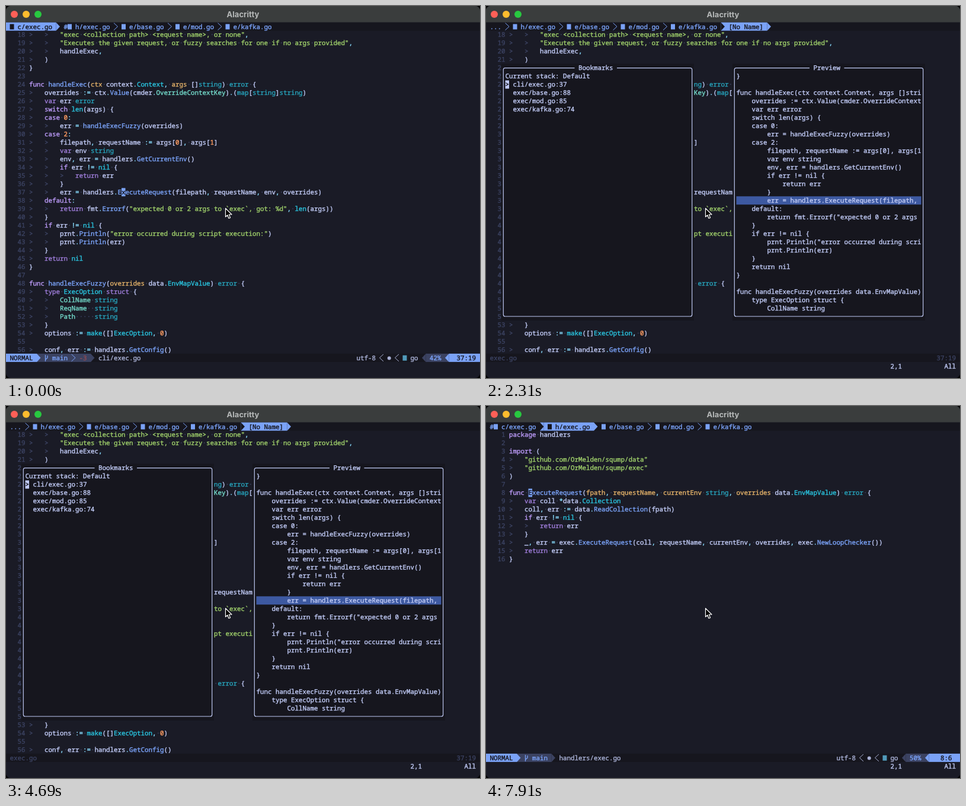
An HTML page with a canvas that plays this animation: 800x628 px, repeating every 8 s.

```html
<!DOCTYPE html>
<html lang="en">
<head>
<meta charset="utf-8">
<title>Terminal</title>
<style>
html, body { margin: 0; width: 800px; height: 628px; overflow: hidden; background: #000; }
canvas { display: block; }
</style>
</head>
<body>
<canvas id="stage" width="800" height="628"></canvas>
<script>
const ctx = document.getElementById('stage').getContext('2d');
const CW = 6.5, CH = 13.98, TOP = 27.7, LOOP = 8000;
const MONO = '10.833px "Noto Sans Mono", "DejaVu Sans Mono", monospace';
const C = {
  bg: '#1a1b26', dark: '#16161e', fg: '#c0caf5', dim: '#3b4261', blue: '#7aa2f7',
  green: '#9ece6a', magenta: '#bb9af7', purple: '#9d7cd8', orange: '#ff9e64',
  cyan: '#2ac3de', builtin: '#27a1b9', yellow: '#e0af68', field: '#73daca',
  op: '#89ddff', soft: '#a9b1d6', select: '#3d59a1', removed: '#914c54', go: '#519aba'
};

const caller = `        "exec <collection path> <request name>, or none",
        "Executes the given request, or fuzzy searches for one if no args provided",
        handleExec,
    )
}

func handleExec(ctx context.Context, args []string) error {
    overrides := ctx.Value(cmder.OverrideContextKey).(map[string]string)
    var err error
    switch len(args) {
    case 0:
        err = handleExecFuzzy(overrides)
    case 2:
        filepath, requestName := args[0], args[1]
        var env string
        env, err = handlers.GetCurrentEnv()
        if err != nil {
            return err
        }
        err = handlers.ExecuteRequest(filepath, requestName, env, overrides)
    default:
        return fmt.Errorf("expected 0 or 2 args to \`exec\`, got: %d", len(args))
    }
    if err != nil {
        prnt.Println("error occurred during script execution:")
        prnt.Println(err)
    }
    return nil
}

func handleExecFuzzy(overrides data.EnvMapValue) error {
    type ExecOption struct {
        CollName string
        ReqName  string
        Path     string
    }
    options := make([]ExecOption, 0)

    conf, err := handlers.GetConfig()`.split('\n');

const callee = `package handlers

import (
    "github.com/OrMelden/sqump/data"
    "github.com/OrMelden/sqump/exec"
)

func ExecuteRequest(fpath, requestName, currentEnv string, overrides data.EnvMapValue) error {
    var coll *data.Collection
    coll, err := data.ReadCollection(fpath)
    if err != nil {
        return err
    }
    _, err = exec.ExecuteRequest(coll, requestName, currentEnv, overrides, exec.NewLoopChecker())
    return err
}`.split('\n');

const words = {
  magenta: 'func package import switch case default if',
  purple: 'var return type struct',
  builtin: 'string error map',
  cyan: 'nil len make Context EnvMapValue ExecOption Collection',
  field: 'OverrideContextKey CollName ReqName Path'
};
const wordColor = new Map();
for (const name in words) for (const w of words[name].split(' ')) wordColor.set(w, C[name]);
const params = /^(ctx|args|overrides|fpath|requestName|currentEnv)$/;

const rowY = row => TOP + row * CH;

function cells(col, row, n, color, rows = 1) {
  ctx.fillStyle = color;
  ctx.fillRect(col * CW, rowY(row), n * CW, rows * CH);
}

// A hairline stroke gives the glyphs a medium weight.
function text(col, row, str, color) {
  ctx.lineWidth = 0.4;
  [...str].forEach((ch, i) => {
    if (ch === ' ') return;
    const x = (col + i) * CW, y = rowY(row) + 10.8;
    ctx.fillStyle = ctx.strokeStyle = ch === '·' ? C.dim : color;
    ctx.fillText(ch, x, y);
    ctx.strokeText(ch, x, y);
  });
}

// Powerline separators: dir 1 points right, -1 points left.
function wedge(col, row, color, dir = 1, solid = true) {
  const x = (col + (dir < 0 ? 1 : 0)) * CW, y = rowY(row);
  ctx.beginPath();
  ctx.moveTo(x, solid ? y : y + 1);
  ctx.lineTo(x + dir * CW, y + CH / 2);
  ctx.lineTo(x, solid ? y + CH : y + CH - 1);
  ctx.fillStyle = ctx.strokeStyle = color;
  ctx.lineWidth = 1;
  if (solid) ctx.fill(); else ctx.stroke();
}

function icon(col, row, color) {
  ctx.fillStyle = color;
  ctx.fillRect(col * CW, rowY(row) + 2.8, 7, 9);
}

function tokenColor(token, line, end) {
  if (token[0] === '"') return C.green;
  if (/^\d+$/.test(token)) return C.orange;
  if (wordColor.has(token)) return wordColor.get(token);
  if (/^\w/.test(token)) {
    if (line[end] === '(') return C.blue;
    return line.startsWith('func') && params.test(token) ? C.yellow : C.fg;
  }
  return /[()[\]{}]/.test(token) ? C.fg : C.op;
}

function code(lines, first) {
  lines.forEach((line, i) => {
    const row = i + 1, indent = line.search(/\S|$/);
    text(0, row, String(first + i).padStart(5), C.dim);
    for (let c = 0; c < indent; c += 4) text(6 + c, row, '>', C.dim);
    for (const m of line.matchAll(/"[^"]*"|\w+|[:!]?=|\S| /g)) {
      if (m.index < indent) continue;
      const end = m.index + m[0].length;
      text(6 + m.index, row, m[0].replace(/ /g, '·'), tokenColor(m[0], line, end));
    }
  });
}

function cursor(col, row, ch, color) {
  cells(col, row, 1, color);
  text(col, row, ch, C.dark);
}

// "■" in a label stands for the file icon.
function tabs(labels, active) {
  cells(0, 0, 124, C.dark);
  let col = 0;
  labels.forEach((label, i) => {
    const on = i === active, end = col + label.length + 2, color = on ? C.dark : C.blue;
    if (on) {
      if (i) {
        cells(col - 1, 0, 1, C.blue);
        wedge(col - 1, 0, C.dark);
      }
      cells(col, 0, end - col, C.blue);
    }
    text(col + 1, 0, label.replace('■', ' '), color);
    const at = label.indexOf('■');
    if (at >= 0) icon(col + 1 + at, 0, color);
    if (on) wedge(end, 0, C.blue);
    else if (i < labels.length - 1 && i + 1 !== active) wedge(end, 0, C.blue, 1, false);
    col = end + 1;
  });
}

function branch(col, row) {
  const x = col * CW + 1.5, y = rowY(row);
  ctx.strokeStyle = C.blue;
  ctx.lineWidth = 1.3;
  ctx.beginPath();
  ctx.moveTo(x, y + 2);
  ctx.lineTo(x, y + 13);
  ctx.moveTo(x, y + 10);
  ctx.lineTo(x + 3.5, y + 7);
  ctx.lineTo(x + 3.5, y + 3);
  ctx.stroke();
}

function status(path, percent, pos, removed) {
  const row = 40, end = removed ? 22 : 17;
  cells(0, row, 124, C.dark);
  cells(8, row, end - 8, C.dim);
  cells(0, row, 8, C.blue);
  wedge(8, row, C.blue);
  wedge(end, row, C.dim);
  text(1, row, 'NORMAL', C.dark);
  branch(10, row);
  text(12, row, 'main', C.blue);
  if (removed) {
    wedge(17, row, C.blue, 1, false);
    text(19, row, removed, C.removed);
  }
  text(end + 2, row, path, C.soft);

  text(91, row, 'utf-8', C.soft);
  wedge(97, row, C.soft, -1, false);
  ctx.fillStyle = C.soft;
  ctx.beginPath();
  ctx.arc(99.5 * CW, rowY(row) + 7.5, 3, 0, 7);
  ctx.fill();
  wedge(101, row, C.soft, -1, false);
  icon(103, row, C.go);
  text(105, row, 'go', C.soft);
  wedge(108, row, C.dim, -1);
  cells(109, row, 6, C.dim);
  text(110, row, percent, C.blue);
  wedge(114, row, C.blue, -1);
  cells(115, row, 9, C.blue);
  text(122 - pos.length, row, pos, C.dark);
}

function idleStatus() {
  cells(0, 40, 124, C.dark);
  text(1, 40, 'exec.go', C.dim);
  text(117, 40, '37:19', C.dim);
}

function panel(col, title) {
  cells(col, 5, 50, C.dark, 31);
  ctx.strokeStyle = C.fg;
  ctx.lineWidth = 1.2;
  ctx.beginPath();
  ctx.roundRect((col + 0.5) * CW, rowY(5.5), 49 * CW, 30 * CH, 3);
  ctx.stroke();
  const start = col + Math.floor((50 - title.length) / 2);
  cells(start - 1, 5, title.length + 2, C.dark);
  text(start, 5, title, C.fg);
}

function popups() {
  panel(4, 'Bookmarks');
  text(5, 6, 'Current stack: Default', C.fg);
  ['cli/exec.go:37', 'exec/base.go:88', 'exec/mod.go:85', 'exec/kafka.go:74']
    .forEach((mark, i) => text(7, 7 + i, mark, C.fg));
  cursor(5, 7, '>', C.fg);

  panel(64, 'Preview');
  cells(65, 21, 48, C.select);
  caller.slice(4, 33).forEach((line, i) => text(65, 6 + i, line.slice(0, 48), C.fg));
}

function titleBar() {
  ctx.fillStyle = '#3a3d3d';
  ctx.fillRect(0, 0, 800, TOP);
  ['#ff5f57', '#febc2e', '#28c840'].forEach((color, i) => {
    ctx.fillStyle = color;
    ctx.beginPath();
    ctx.arc(14 + i * 20, 14, 6, 0, 7);
    ctx.fill();
  });
  ctx.font = 'bold 13px Inter, "Open Sans", sans-serif';
  ctx.textAlign = 'center';
  ctx.fillStyle = '#b6b9b9';
  ctx.fillText('Alacritty', 400, 18.5);
  ctx.textAlign = 'left';
}

function pointer() {
  ctx.beginPath();
  [[370.5, 341.5], [370.5, 356], [373.8, 353], [376, 358.5], [378.6, 357.4], [376.3, 352], [381, 352]]
    .forEach(([x, y]) => ctx.lineTo(x, y));
  ctx.closePath();
  ctx.fillStyle = '#000';
  ctx.strokeStyle = '#fff';
  ctx.lineWidth = 1.2;
  ctx.fill();
  ctx.stroke();
}

const files = ['■ e/base.go', '■ e/mod.go', '■ e/kafka.go'];
const starts = [0, 2100, 5810, 5880, 7420];
const [START, MENU, CLOSING, BACK, JUMPED] = starts.keys();

function draw(state) {
  ctx.fillStyle = C.bg;
  ctx.fillRect(0, 0, 800, 628);
  titleBar();
  ctx.font = MONO;
  ctx.textRendering = 'geometricPrecision';
  ctx.lineJoin = 'round';

  if (state === JUMPED) {
    tabs(['#■ c/exec.go', '■ h/exec.go', ...files], 1);
    code(callee, 1);
    cursor(11, 8, 'E', C.blue);
    status('handlers/exec.go', '50%', '8:6 ');
  } else {
    code(caller, 18);
    cursor(30, 20, 'x', C.blue);
    if (state === MENU || state === CLOSING) {
      tabs(['...', '■ h/exec.go', ...files, '[No Name]'], 5);
      idleStatus();
    } else {
      tabs(['■ c/exec.go', '#■ h/exec.go', ...files], 0);
      status('cli/exec.go', '42%', '37:19', '-3');
    }
    if (state === MENU) popups();
  }
  if (state !== START) {
    text(105, 41, '2,1', C.fg);
    text(119, 41, 'All', C.fg);
  }
  pointer();
}

// Rounded window corners.
ctx.beginPath();
ctx.roundRect(0, 0, 800, 628, 8);
ctx.clip();

let shown = -1;
function tick() {
  const t = performance.now() % LOOP;
  const state = starts.findLastIndex(s => t >= s);
  if (state !== shown) draw(shown = state);
  requestAnimationFrame(tick);
}
tick();
</script>
</body>
</html>
```
